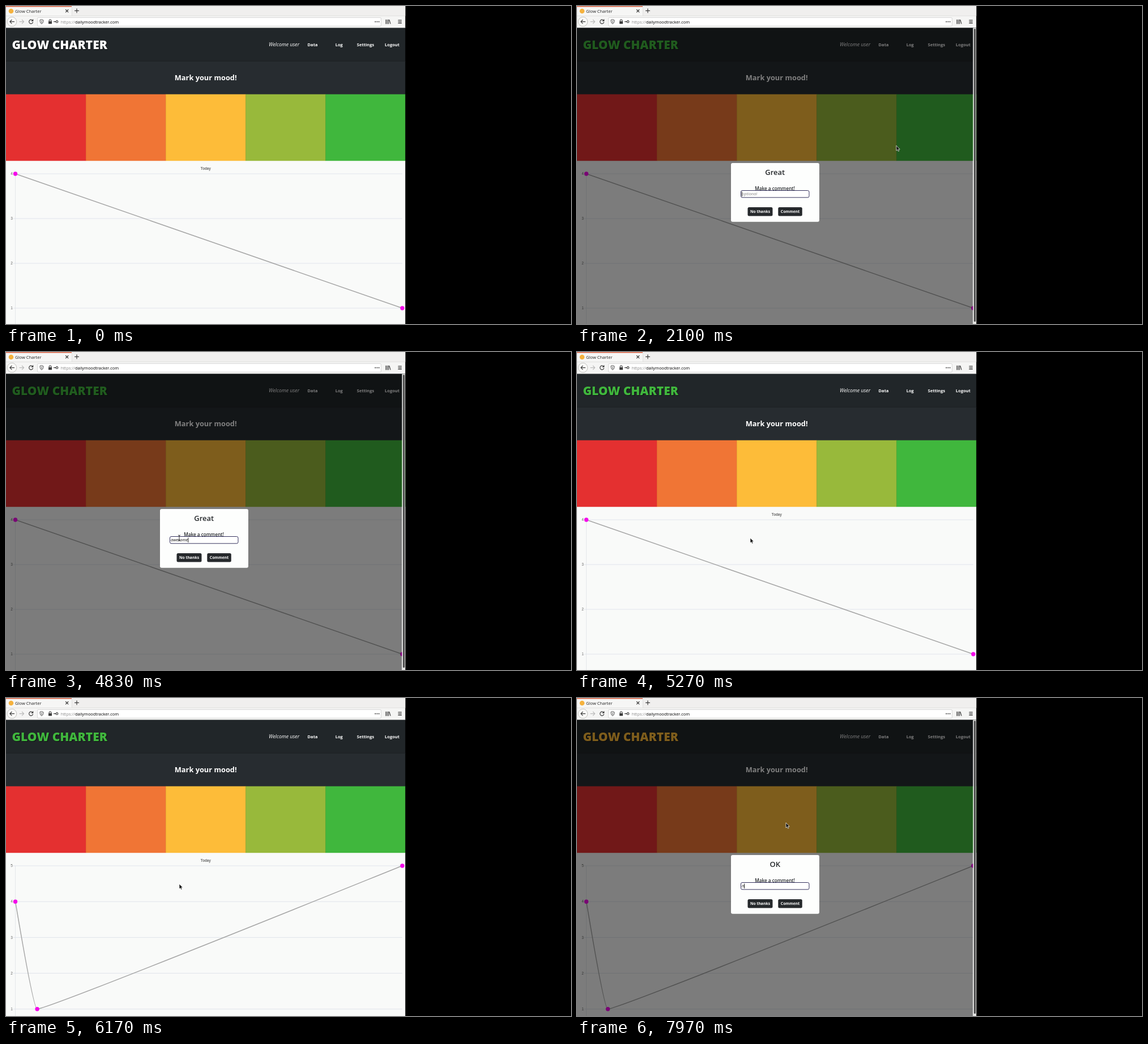
An HTML page for the animation above (8 s loop, 998x561 px).

```html
<!DOCTYPE html>
<html lang="en">
<head>
<meta charset="utf-8">
<title>Glow Charter</title>
<style>
  html, body { margin: 0; width: 100%; height: 100%; overflow: hidden; background: #000; }
  svg { display: block; width: 100vw; height: 100vh; font-family: "Open Sans", "Noto Sans", sans-serif; }
  .bold { font-weight: 700; }
  .semi { font-weight: 600; }
  .mid { text-anchor: middle; }
  .icon { fill: none; stroke: #3c3c3c; stroke-width: 1.2; stroke-linecap: round; stroke-linejoin: round; }
  #chart text { font-family: "Liberation Sans", Arial, sans-serif; fill: #666; font-size: 6.5px; }
</style>
</head>
<body>
<svg viewBox="0 0 998 561">
  <defs><clipPath id="window"><rect width="705.3" height="561"/></clipPath></defs>
  <rect width="998" height="561"/>
  <g clip-path="url(#window)">
    <!-- browser bars -->
    <rect width="706" height="39" fill="#f5f5f4"/>
    <rect width="706" height="17" fill="#f0efee"/>
    <rect width="116" height="17" fill="#f6f6f5"/>
    <rect width="116" height="1.6" fill="#dd6b4d"/>
    <path d="M116.5 2V17M0 17.5H706" stroke="#dcdcda" stroke-width=".8"/>
    <circle cx="9" cy="9" r="4.3" fill="#f5b23d"/>
    <text x="16" y="11.5" font-size="7.6" fill="#222">Glow Charter</text>
    <path class="icon" d="M105.5 6.5l4.4 4.4m0-4.4l-4.4 4.4M125 4.8v7M121.5 8.3h7"/>
    <rect x="55.5" y="20.5" width="607" height="15" rx="1.5" fill="#fff" stroke="#d0d0ce" stroke-width=".8"/>
    <circle cx="10.5" cy="27.7" r="8.3" fill="#fafaf8" stroke="#bcbcb8" stroke-width=".9"/>
    <path class="icon" d="M14.5 27.7H7m3-3.2l-3.2 3.2 3.2 3.2"/>
    <path class="icon" style="stroke:#bbb" d="M24 27.7h7.4m-3-3.2l3.2 3.2-3.2 3.2"/>
    <path class="icon" d="M47 25.6a3.5 3.5 0 1 0 .5 3.2M47.7 23.8v2.5h-2.5"/>
    <path class="icon" style="stroke-width:.9" d="M63 24l3 1c0 3-.7 5.3-3 6.5c-2.3-1.2-3-3.5-3-6.5zM63 26v3.5"/>
    <path class="icon" d="M76.2 27v-1.2a1.8 1.8 0 0 1 3.6 0V27"/>
    <rect x="75" y="27" width="6" height="4.5" rx=".5" fill="#3c3c3c"/>
    <path class="icon" d="M84.5 27.7h3.5"/>
    <circle class="icon" cx="90" cy="27.7" r="1.8"/>
    <text x="96.7" y="30.6" font-size="7.4"><tspan fill="#888">https://</tspan>dailymoodtracker.com</text>
    <g fill="#3c3c3c"><circle cx="652.3" cy="27.7" r="1"/><circle cx="655.5" cy="27.7" r="1"/><circle cx="658.7" cy="27.7" r="1"/></g>
    <path class="icon" d="M671 24.3v7M673.3 24.3v7M675.6 24.3v7M677 24.5l2 6.7M693 25.2h5.5M693 27.8h5.5M693 30.4h5.5"/>

    <!-- page -->
    <rect y="38.5" width="706" height="59" fill="#212629"/>
    <rect y="97" width="706" height="59" fill="#272c30"/>
    <path d="M0 97.3H706" stroke="#1b1f22" stroke-width=".8"/>
    <text id="title" x="10.5" y="76.2" font-size="21" font-weight="800" style="text-shadow:1px 1px 1px #0008">GLOW CHARTER</text>
    <g fill="#fff" font-size="7.5">
      <text x="464" y="71" font-size="8.9" font-style="italic">Welcome user</text>
      <g class="bold mid">
        <text x="541.5" y="70.5">Data</text>
        <text x="588.3" y="70.5">Log</text>
        <text x="635" y="70.5">Settings</text>
        <text x="682" y="70.5">Logout</text>
        <text x="352.7" y="131.3" font-size="12.8">Mark your mood!</text>
      </g>
    </g>
    <rect y="273" width="706" height="288" fill="#f9faf9"/>
    <g id="moods"></g>
    <rect id="focus" y="156.5" width="136" height="116" fill="none" stroke="#fff" stroke-opacity=".75" stroke-dasharray="1.5 1.5"/>
    <g id="chart">
      <text class="bold mid" x="352.8" y="289" style="font-size:6.3px">Today</text>
      <path d="M16.5 296V561" stroke="#dfe2e8" stroke-width=".8"/>
      <g id="grid"></g>
      <path id="curve" fill="none" stroke="#a6a6a6" stroke-width="1.5"/>
      <g id="dots" fill="#f408ea"></g>
    </g>

    <!-- dialog -->
    <g id="modal">
      <rect y="38.5" width="699.5" height="523" fill-opacity=".5"/>
      <rect x="699.5" y="39" width="6" height="522" fill="#e6e6e4"/>
      <rect x="701.2" y="40" width="3" height="517" rx="1.5" fill="#454545"/>
      <rect x="272" y="277" width="156" height="103.7" rx="3" fill="#fdfefd"/>
      <g class="semi mid" fill="#25282b">
        <text id="mood" x="349.7" y="298.3" font-size="13"></text>
        <text x="349.5" y="324.7" font-size="8.2">Make a comment!</text>
      </g>
      <rect x="289.5" y="325.5" width="120.5" height="12.3" rx="2.5" fill="#fff" stroke="#36335f"/>
      <text id="entry" x="291" y="334.3" font-size="7.4" font-style="italic"></text>
      <path id="caret" d="M0 327.5v8.5" stroke="#111" stroke-width=".9"/>
      <rect x="301.5" y="355" width="44" height="15.5" rx="2.5" fill="#26292c"/>
      <rect x="355.3" y="355" width="42.5" height="15.5" rx="2.5" fill="#26292c"/>
      <g class="bold mid" fill="#fff" font-size="6.8">
        <text x="323.5" y="365.4">No thanks</text>
        <text x="376.5" y="365.4">Comment</text>
      </g>
    </g>
    <g id="cursor">
      <path id="arrow" d="M0 0v9l2-1.8 1.5 3 1.5-.7-1.4-2.9h2.7z" fill="#111" stroke="#fff" stroke-width=".7"/>
      <path id="beam" d="M-2-5q2 0 2 1.5q0-1.5 2-1.5M0-4v8M-2 5q2 0 2-1.5q0 1.5 2 1.5" fill="none" stroke="#222" stroke-width=".9"/>
    </g>
  </g>
</svg>
<script>
const LOOP = 8000, COMMENT = "awesome", COLORS = ["#e43030", "#f07535", "#fdbc39", "#98b93b", "#40b73d"];
const GREEN = COLORS[4], AMBER = COLORS[2];
const CHART_START = 5347, CHART_TIME = 1000;
const LEFT = 16.5, RIGHT = 700, TOP = 296, HEIGHT = 316, TENSION = 0.05;
const MOVES = [[870, 706, 338], [1400, 608, 220], [1900, 608, 220], [2520, 430, 326],
               [3150, 306, 328], [6190, 306, 328], [6480, 369, 220]];

const $ = id => document.getElementById(id);
const clamp = v => Math.max(0, Math.min(1, v));
const ramp = (t, a, b) => clamp((t - a) / (b - a));
const mix = (a, b, k) => a + (b - a) * k;
const mixPoint = (p, q, k) => [mix(p[0], q[0], k), mix(p[1], q[1], k)];
const show = (id, on) => $(id).setAttribute("visibility", on ? "inherit" : "hidden");
const valueY = (value, max) => TOP + HEIGHT * (1 - value / max);

$("moods").innerHTML = COLORS.map((c, i) =>
  `<rect x="${i * 141.1}" y="155.7" width="141.5" height="117.5" fill="${c}"/>`).join("");

// Each node holds its point and the bezier handles before and after it.
function spline(points) {
  return points.map((p, i) => {
    const before = points[i - 1] || p, after = points[i + 1] || p;
    const d1 = Math.hypot(p[0] - before[0], p[1] - before[1]);
    const d2 = Math.hypot(after[0] - p[0], after[1] - p[1]);
    const handle = k => [p[0] + k * (after[0] - before[0]), p[1] + k * (after[1] - before[1])];
    return [p, handle(-TENSION * d1 / (d1 + d2)), handle(TENSION * d2 / (d1 + d2))];
  });
}

const oldNodes = spline([[LEFT, valueY(4, 4)], [RIGHT, valueY(1, 4)]]);
const newNodes = spline([[LEFT, valueY(4, 5)], [54.5, valueY(1, 5)], [RIGHT, valueY(5, 5)]]);

function drawChart(t) {
  const updated = t >= CHART_START, max = updated ? 5 : 4;
  const k = 1 - (1 - ramp(t, CHART_START, CHART_START + CHART_TIME)) ** 4;
  const nodes = updated
    ? newNodes.map((node, i) => oldNodes[i] ? node.map((p, j) => mixPoint(oldNodes[i][j], p, k)) : node)
    : oldNodes;
  let grid = "", path = `M${nodes[0][0]}`;
  for (let v = 1; v <= max; v++) {
    const y = valueY(v, max);
    grid += `<path d="M12.5 ${y}H${RIGHT}" stroke="#dadfe7" stroke-width=".8"/>
      <text x="11.8" y="${y + 2.2}" text-anchor="end">${v}</text>`;
  }
  for (let i = 1; i < nodes.length; i++) path += `C${nodes[i - 1][2]} ${nodes[i][1]} ${nodes[i][0]}`;
  $("grid").innerHTML = grid;
  $("curve").setAttribute("d", path);
  $("dots").innerHTML = nodes.map(([p]) => `<circle cx="${p[0]}" cy="${p[1]}" r="3.7"/>`).join("");
}

function drawModal(t) {
  const second = t > 6000;
  const opacity = second ? ramp(t, 6580, 6880) : ramp(t, 1760, 2060) - ramp(t, 4840, 5100);
  show("modal", opacity > 0);
  $("modal").setAttribute("opacity", opacity);
  $("mood").textContent = second ? "OK" : "Great";
  const typed = second ? (t >= 7930 ? "n" : "")
    : COMMENT.slice(0, Math.ceil(ramp(t, 3800, 4530) * COMMENT.length));
  const entry = $("entry");
  entry.textContent = typed || "optional";
  entry.setAttribute("fill", typed ? "#111" : "#858585");
  const width = typed ? entry.getComputedTextLength() : 0;
  $("caret").setAttribute("transform", `translate(${291.3 + width})`);
  show("caret", second ? t >= 7690 : t >= 3770 || t < 2660);
  $("title").setAttribute("fill", t < 1760 ? "#fff" : t < 6580 ? GREEN : AMBER);
  show("focus", t >= 1640 && t < 1800 || t >= 6510 && t < 6620);
  $("focus").setAttribute("x", second ? 285.5 : 568.5);
  return opacity;
}

function drawCursor(t, opacity) {
  let [, x, y] = MOVES[0];
  for (let i = 1; i < MOVES.length; i++) {
    const [t0, x0, y0] = MOVES[i - 1], [t1, x1, y1] = MOVES[i];
    if (t < t0) break;
    const k = ramp(t, t0, t1), ease = k * k * (3 - 2 * k);
    x = mix(x0, x1, ease);
    y = mix(y0, y1, ease);
  }
  const overInput = opacity > 0 && x > 289 && x < 410 && y > 325 && y < 338;
  show("cursor", t >= MOVES[0][0]);
  show("arrow", !overInput);
  show("beam", overInput);
  $("cursor").setAttribute("transform", `translate(${x} ${y})`);
}

function draw(now) {
  const t = now % LOOP;
  drawChart(t);
  drawCursor(t, drawModal(t));
  requestAnimationFrame(draw);
}
requestAnimationFrame(draw);
</script>
</body>
</html>
```
